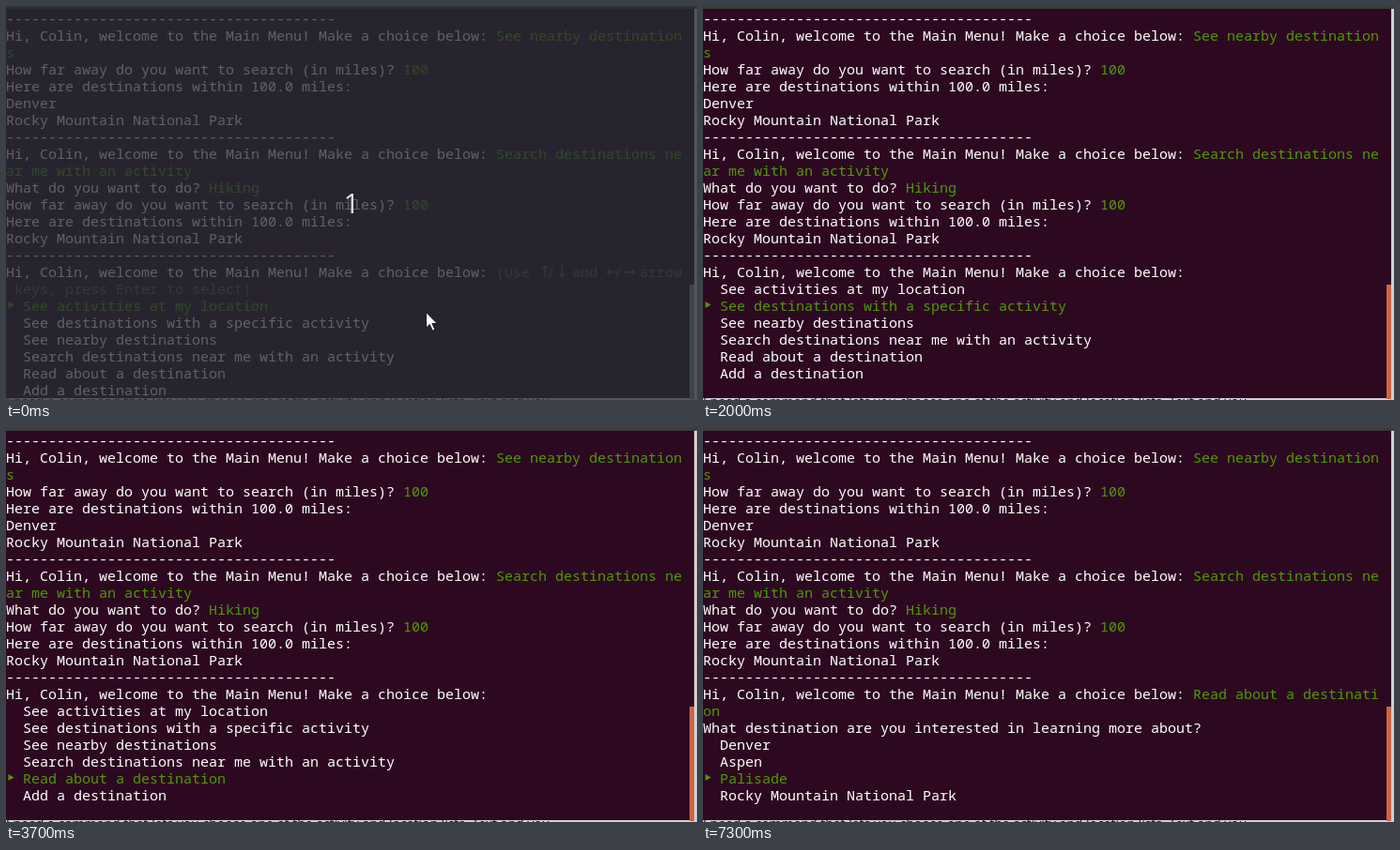
Write an HTML page that moves like this. It is 736 px wide and 420 px high and loops after 8 s.

```html
<!DOCTYPE html>
<html lang="en">
<head>
<meta charset="utf-8">
<title>Travel menu in a terminal</title>
<style>
html, body { margin: 0; width: 100%; height: 100%; overflow: hidden; background: #2c0920; }
svg { display: block; width: 736px; height: 420px; }
text { white-space: pre; }
#rows { font: 15px "Noto Sans Mono", "DejaVu Sans Mono", monospace; }
.w { fill: #fff; }
.g { fill: #4e9a06; }
.h { fill: #555753; }
.arrow { font: 17px "DejaVu Sans", sans-serif; }
</style>
</head>
<body>
<svg viewBox="0 0 736 420" xmlns="http://www.w3.org/2000/svg">
  <defs>
    <clipPath id="edge"><rect y="418" width="733" height="2"/></clipPath>
    <clipPath id="term"><rect width="728" height="419"/></clipPath>
  </defs>
  <rect width="736" height="420" fill="#2c0920"/>
  <g clip-path="url(#edge)">
    <rect y="418" width="733" height="2" fill="#d2d0d1"/>
    <text x="0" y="427" font-family="Open Sans, sans-serif" font-size="14" fill="#1c1a1b">I need a command that lets you choose one of the activity and location lists. Text and you</text>
  </g>
  <rect id="top" width="736" height="3" fill="#3c3b3b"/>
  <rect x="733" y="3" width="3" height="417" fill="#d2d0d1"/>
  <rect id="bar" x="728" y="297" width="5" height="122"/>
  <g id="rows" clip-path="url(#term)"></g>
  <path id="beam" d="M447 322.5h2l1 1 1-1h2M450 323.5v12M447 336.5h2l1-1 1 1h2" fill="none" stroke="#e6ebc0"/>
  <g id="count">
    <rect width="736" height="420" fill="rgb(39,46,52)" fill-opacity=".75"/>
    <text x="368" y="221" text-anchor="middle" font-family="Open Sans, sans-serif" font-size="30" fill="#e2e2e4">1</text>
    <path d="M447.5 326.5v16.5l3.8-3.6 3 6.6 2.6-1.2-3-6.3h5.2z" fill="#fff" stroke="#111" stroke-width=".9"/>
  </g>
</svg>
<script>
const LOOP = 8000, CELL = 9, ROW = 18;
const $ = id => document.getElementById(id);
const white = s => ["w", s], green = s => ["g", s], hint = s => ["h", s];

const rule = [white("-".repeat(39))];
const hello = white("Hi, Colin, welcome to the Main Menu! Make a choice below: ");
const ask = white("What destination are you interested in learning more about? ");
const far = [white("How far away do you want to search (in miles)? "), green("100")];
const within = [white("Here are destinations within 100.0 miles:")];
const park = "Rocky Mountain National Park";

const history = [
  rule,
  [hello, green("See nearby destination")], [green("s")],
  far, within, [white("Denver")], [white(park)],
  rule,
  [hello, green("Search destinations ne")], [green("ar me with an activity")],
  [white("What do you want to do? "), green("Hiking")],
  far, within, [white(park)],
  rule
];
const actions = [
  "See activities at my location",
  "See destinations with a specific activity",
  "See nearby destinations",
  "Search destinations near me with an activity",
  "Read about a destination",
  "Add a destination"
];
const places = ["Denver", "Aspen", "Palisade", park];

const options = (items, pick) => items.map((s, i) => [[i === pick ? "g" : "w", "  " + s, i === pick]]);

function menu(pick, help) {
  const head = help
    ? [[hello, hint("(Use ↑/↓ and ←/→ arrow")], [hint(" keys, press Enter to select)")]]
    : [[hello]];
  return [...head, ...options(actions, pick)];
}

function chooser(pick, help) {
  const head = help
    ? [[ask, hint("(Use ↑/↓ arrow keys,")], [hint(" press Enter to select)")]]
    : [[ask]];
  return [[hello, green("Read about a destinati")], [green("on")], ...head, ...options(places, pick)];
}

const scenes = [
  [0, menu(0, true)],
  [2000, menu(1)],
  [2600, menu(2)],
  [3200, menu(3)],
  [3700, menu(4)],
  [5000, chooser(0, true)],
  [6100, chooser(1)],
  [7300, chooser(2)]
];

const label = (cls, x, y, s) => `<text class="${cls}" x="${x}" y="${y}">${s}</text>`;

// Arrow glyphs are wider than a cell, so each is set on its own.
function drawRun([cls, s, picked], col, y) {
  let out = picked ? `<path class="g" d="M2.5 ${y - 10}l6 3.5-6 3.5z"/>` : "";
  for (const m of s.matchAll(/[↑↓←→]|[^↑↓←→]+/g)) {
    const x = (col + m.index) * CELL;
    const kind = /[↑↓←→]/.test(m[0]) ? cls + " arrow" : cls;
    out += label(kind, x, y, m[0]);
  }
  return out;
}

function drawRow(runs, i) {
  let col = 0;
  return runs.map(run => {
    const out = drawRun(run, col, 19 + i * ROW);
    col += run[1].length;
    return out;
  }).join("");
}

let shown = null;

function render(t) {
  const scene = scenes.filter(([start]) => start <= t).pop()[1];
  if (scene !== shown) {
    shown = scene;
    $("rows").innerHTML = [...history, ...scene].map(drawRow).join("");
  }
  const show = (id, on) => $(id).setAttribute("visibility", on ? "visible" : "hidden");
  show("count", t < 500);
  show("beam", t >= 500 && t < 1600);
  $("bar").setAttribute("fill", t < 1200 ? "#8b8688" : t < 1300 ? "#ad7565" : "#ce6442");
}

function tick(now) {
  render(now % LOOP);
  requestAnimationFrame(tick);
}
render(0);
requestAnimationFrame(tick);
</script>
</body>
</html>
```
